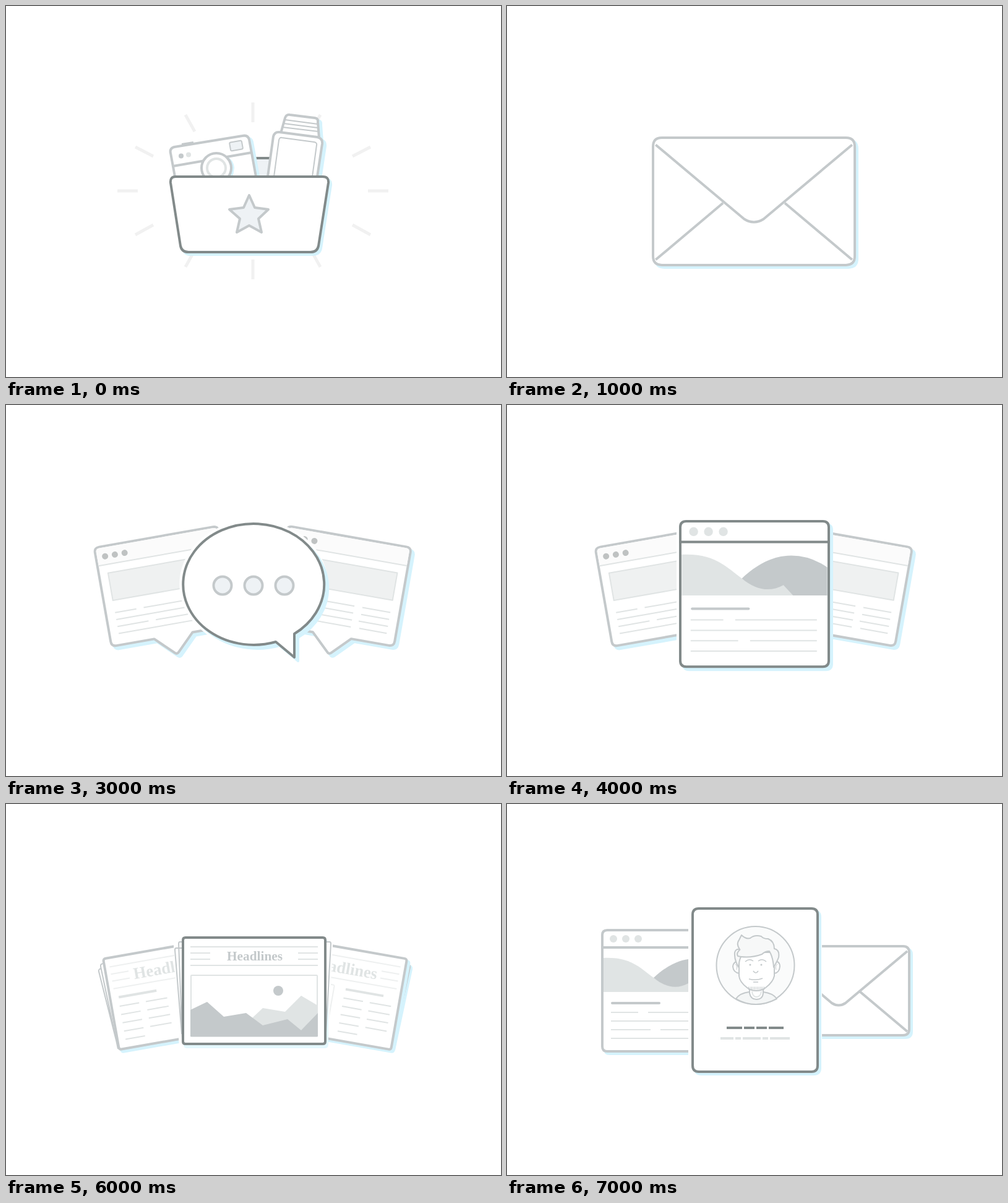
An HTML page for the animation above (8 s loop, 800x600 px).

```html
<!DOCTYPE html>
<html lang="en">
<head>
<meta charset="utf-8">
<title>Collections</title>
<style>
  html, body { margin: 0; width: 100%; height: 100%; overflow: hidden; background: #fff; }
  svg { display: block; width: 800px; height: 600px; fill: none; stroke-linejoin: round; }
  path, circle { vector-effect: non-scaling-stroke; }
  text { font-family: "Liberation Serif", serif; font-weight: bold; text-anchor: middle; }
</style>
</head>
<body>
<svg id="stage" viewBox="0 0 800 600"></svg>
<script>
const DARK = '#828a8a', GRAY = '#c4c9cb', MID = '#d6dada', LIGHT = '#e0e4e4', PALE = '#eef2f5';
const WHITE = '#fff', CYAN = '#d5f3fd', ICE = '#e4f8fe';

// Drawing helpers; each returns SVG markup or path data
const line = (d, stroke = GRAY, width = 4, fill = 'none') =>
  `<path d="${d}" stroke="${stroke}" stroke-width="${width}" fill="${fill}"/>`;
const solid = (d, fill) => `<path d="${d}" fill="${fill}"/>`;
const ring = (x, y, r, stroke, width, fill = 'none') =>
  `<circle cx="${x}" cy="${y}" r="${r}" stroke="${stroke}" stroke-width="${width}" fill="${fill}"/>`;
const dot = (x, y, r, fill) => `<circle cx="${x}" cy="${y}" r="${r}" fill="${fill}"/>`;
const put = (transform, body) => `<g transform="${transform}">${body}</g>`;
const shadow = (d, color = CYAN, dx = 5, dy = 5, transform = '') =>
  put(`translate(${dx} ${dy}) ${transform}`, line(d, color, 4, color));
const halo = (d, width = 12) => line(d, WHITE, width, WHITE);
const box = (x, y, w, h, r = 0) =>
  `M${x + r} ${y}h${w - 2 * r}q${r} 0 ${r} ${r}v${h - 2 * r}q0 ${r} ${-r} ${r}h${2 * r - w}q${-r} 0 ${-r} ${-r}v${2 * r - h}q0 ${-r} ${r} ${-r}Z`;
// Horizontal dashes at height y, given as start/end pairs
const row = (y, ...xs) => xs.map((x, i) => (i % 2 ? `H${x}` : `M${x} ${y}`)).join('');
const tilt = (x, y, angle, scale = 1) => `translate(${x} ${y}) rotate(${angle}) scale(${scale})`;

function stuffedFolder() {
  const camera = 'M273 276L266 238Q264 230 272 228L382 210Q391 208 393 216L404 276Z';
  const cards = 'M444 206L451 181Q453 175 459 176L499 181Q505 182 504 188L506 214Z';
  const phone = 'M423 276L432 211Q434 203 442 204L503 212Q512 214 511 223L503 276Z';
  const front = 'M274 276H512Q522 276 521 286L505 388Q503 398 492 398H295Q284 398 282 388L266 286Q265 276 274 276Z';
  const rays = 'M399 156v32M399 410v32M180 299h33M585 299h33M290 176l15 27M508 176l-15 27M209 228l29 15M589 228l-29 15'
    + 'M209 370l29-16M589 370l-29-16M290 422l15-27M508 422l-15-27';
  return line(rays, '#f1f1f1', 5)
    + solid('M390 246H440V276H390Z', PALE) + line('M390 246H440', DARK)
    + shadow(camera, CYAN, 5, 4) + line('M284 224L303 221') + line(camera, GRAY, 4, WHITE) + line('M270 259L397 237')
    + solid('M364 262a24 24 0 0 0 -10 -20q14 5 15 20l-2 12h-8Z', CYAN)
    + ring(340, 262, 24, GRAY, 4, WHITE) + ring(340, 262, 15, LIGHT, 4)
    + dot(283, 242.5, 4, GRAY) + dot(295, 240.5, 4, LIGHT)
    + put('rotate(-10 372 226)', line(box(362, 219, 20, 14, 2), GRAY, 2, PALE))
    + shadow(cards, CYAN, 5, 4) + shadow(phone, CYAN, 5, 4)
    + line(cards, GRAY, 4, WHITE) + line('M451 184l53 7M449 190l55 7M447 196l58 7', GRAY, 2)
    + line(phone, GRAY, 4, WHITE)
    + line('M433 276L441 217Q442 212 446 213L498 220Q503 221 502 225L495 276', GRAY, 2)
    + shadow(front, CYAN, 4, 4) + line(front, DARK, 4, WHITE)
    + line('M393 306L402 326L424 329L408 344L413 366L393 355L373 366L378 344L361 329L384 326Z', GRAY, 4, PALE);
}

function envelope() {
  return line(box(0, 0, 228, 144, 10), GRAY, 4, WHITE)
    + line('M3 8L103 92Q114 99 125 92L225 8M79 74L3 138M149 74L225 138');
}

function bigLetter() {
  const place = 'translate(236 213) scale(1.43)';
  return shadow(box(0, 0, 228, 144, 10), CYAN, 4, 4, place) + put(place, envelope());
}

const fullTable = 'M403 265V361M431 265V361' + row(341, 318, 476)
  + row(275, 320, 378, 407, 421, 438, 472) + row(287, 320, 356, 407, 425, 438, 451)
  + row(299, 320, 366, 407, 419, 438, 461) + row(311, 320, 376, 407, 415, 438, 470)
  + row(323, 320, 348, 360, 388, 407, 425, 438, 443, 451, 463)
  + row(351, 407, 421, 438, 459) + row(385, 318, 362) + row(397, 318, 342);

const column = x => row(275, x, x + 38) + row(287, x, x + 18) + row(299, x, x + 27)
  + row(311, x, x + 36) + row(323, x, x + 9, x + 15, x + 30);
const leftTable = 'M363 265V361' + column(320)
  + row(275, 375, 385, 390, 404) + row(287, 375, 412) + row(299, 375, 402) + row(311, 375, 392) + row(323, 375, 410);
const rightTable = 'M425 265V361' + column(434) + row(275, 375, 412) + row(287, 375, 412) + row(323, 400, 410);

const cover = box(286, 175, 224, 266, 6);
const backCover = 'M508 184H518Q520 184 520 186V210H526Q528 210 528 213V249Q528 252 525 252H520V430Q520 432 518 432H508';

function documentFolder(edge, ink, table) {
  const sheet = box(303, 193, 190, 234);
  const turned = angle => put(`rotate(${angle} 398 310)`, line(sheet, GRAY, 2, WHITE));
  return line(backCover, edge, 4, WHITE) + line(cover, edge, 4, edge === DARK ? '#f7f8f8' : '#fcfcfc')
    + turned(2) + turned(-2)
    + put('translate(3 3)', `<g opacity=".6">${solid(sheet, '#a9ddf0')}</g>`)
    + line(sheet, GRAY, 2, WHITE) + ring(335, 225, 14, ink, 2)
    + line(row(217, 420, 454) + row(229, 420, 474) + row(265, 318, 476) + row(361, 318, 476) + table, ink, 2);
}

function documents() {
  const side = (x, y, angle, table) =>
    put(tilt(x, y, angle, .812) + ' translate(-286 -175)', documentFolder(GRAY, MID, table));
  return solid('M222 428L290 416V404L222 418ZM510 404L590 422V428L510 414Z', ICE)
    + side(172, 214, -10, leftTable) + side(447, 182, 10, rightTable)
    + shadow(backCover, ICE) + shadow(cover, ICE) + documentFolder(DARK, MID, fullTable);
}

const bubbleWindow = 'M8 0H195Q203 0 203 8V154Q203 162 195 162H133L105 190Q102 193 99 190L70 162H8Q0 162 0 154V8Q0 0 8 0Z';
const plainWindow = box(0, 0, 203, 162, 8);

function page(frame, gaps) {
  const text = gaps.map(([from, to], i) => row(109 + i * 11.4, 15, from, to, 188)).join('');
  return line(frame, GRAY, 4, WHITE) + solid('M2 8Q2 2 8 2H195Q201 2 201 8V30H2Z', '#fbfbfb')
    + line(row(30, 2, 201), LIGHT, 2)
    + [14, 30, 46].map(x => dot(x + 1, 16.5, 5, '#bfc2c2')).join('')
    + line(box(15, 44, 173, 45), LIGHT, 2, '#eff1f1') + line(text, LIGHT, 2);
}

function pagePair(frame) {
  const side = (transform, gaps) => shadow(frame, CYAN, 5, 5, transform) + put(transform, page(frame, gaps));
  return side(tilt(142.5, 231, -10), [[50, 62], [188, 188], [66, 78], [188, 188]])
    + side(tilt(455, 195.5, 10), [[129, 142], [129, 142], [129, 140], [129, 143]]);
}

function chat() {
  const bubble = 'M466 370A114 98 0 1 0 436 383L466 408Z';
  return pagePair(bubbleWindow) + halo(bubble) + shadow(bubble, CYAN, 6, 6) + line(bubble, DARK, 4, WHITE)
    + [350, 400, 450].map(x => ring(x, 292, 14.5, GRAY, 4, PALE)).join('');
}

function browser(edge) {
  return line(box(0, 0, 200, 196, 8), edge, 4, WHITE) + line(row(28, 0, 200), edge)
    + [18, 38, 58].map(x => dot(x, 14, 6, LIGHT)).join('')
    + solid('M83 77C101 60 121 49 139 47Q170 43 198 62V100H83Z', GRAY)
    + solid('M2 45C46 43 61 61 83 77C102 93 121 96 139 86L152 100H2Z', LIGHT)
    + `<path d="${row(118, 16, 92)}" stroke="${GRAY}" stroke-width="4" stroke-linecap="round"/>`
    + line(row(133, 14, 58, 74, 184) + row(147, 14, 184) + row(161, 14, 78, 94, 184) + row(175, 14, 184), LIGHT, 2);
}

function browsers() {
  const frame = box(0, 0, 200, 196, 8), place = 'translate(280 188) scale(1.2)';
  return pagePair(plainWindow) + put(place, halo(frame)) + shadow(frame, CYAN, 5, 5, place) + put(place, browser(DARK));
}

function shirts() {
  const main = 'M272 237L326 205Q340 195 358 194Q400 192 442 194Q460 195 474 205L529 237L506 281L473 266V387'
    + 'Q455 399 400 399Q345 399 326 387V266L295 281Z';
  const side = 'M151 270L191 232Q200 224 212 221Q255 211 300 207Q360 200 380 240L400 370Q300 390 250 392Q228 393 220 388L202 284L177 303Z';
  const mirror = 'translate(801 0) scale(-1 1)';
  const neck = 'M222 219C232 251 282 251 284 209';
  const sideBody = line(side, GRAY, 4, WHITE) + solid('M223 220l8-2q3 14 12 23q-14-6-20-21Z', CYAN)
    + put('rotate(-8 256 232)', line('M243 240V226Q243 224 245 224H267Q269 224 269 226V240', LIGHT, 2)
      + line(row(231, 249, 264) + row(235, 249, 264), LIGHT, 2))
    + line(neck);
  return shadow(side, CYAN, 6, 6) + sideBody
    + shadow(side, CYAN, 6, 6, mirror) + put(mirror, sideBody)
    + put('rotate(-10 270.5 304)', line(box(241, 275, 59, 58, 5), LIGHT, 4, '#f8fafc'))
    + ring(531, 303.5, 29, LIGHT, 4, '#f8fafc')
    + halo(main, 14) + shadow(main, CYAN, 6, 6) + line(main, DARK, 4, WHITE)
    + line('M282 231L304 276M293 225L317 270M518 231L496 276M507 225L483 270', GRAY, 6)
    + line('M357 195C359 248 441 248 443 195', GRAY)
    + line(box(383, 206, 32, 22, 2) + row(214, 390, 408) + row(218, 390, 408), LIGHT, 2)
    + line('M364 195C366 238 434 238 436 195', DARK) + line(main, DARK)
    + line('M372 327Q364 327 368 320L397 268Q401 261 405 268L434 320Q438 327 430 327Z', GRAY, 4, PALE);
}

function news() {
  const front = box(286, 216, 230, 172, 4), small = box(0, 0, 199, 149, 4);
  const title = (x, y, size, fill) => `<text x="${x}" y="${y}" font-size="${size}" fill="${fill}">Headlines</text>`;
  const side = (transform, offset, extra) => {
    let columns = '';
    for (let i = 0; i < 5; i++) {
      columns += row(80 + i * 13.6, ...[13, 45, ...(i < 4 ? [56, 91] : [])].map(x => x + offset));
    }
    return shadow(small, CYAN, 4, 4, transform) + put(transform, line(small, GRAY, 4, WHITE)
      + line(row(14.5, 8, 191) + row(26.5, 8, 37, 162, 191) + row(38, 8, 37, 162, 191) + row(50.5, 8, 191) + extra, '#eef0f0', 2)
      + title(100, 41, 26.5, LIGHT)
      + line(row(65.5, 14 + offset, 76 + offset), LIGHT) + line(columns, LIGHT, 2));
  };
  return line('M154 266Q149 267 150 271L181 394M158 258Q152 258 153 263L181 396', GRAY, 2, WHITE)
    + side(tilt(157, 250.5, -10), 0, '')
    + shadow('M647 258Q654 259 653 264L625 395', CYAN, 2, 3)
    + line('M647 258Q654 259 653 264L625 395', GRAY, 2, WHITE)
    + side(tilt(452, 216, 10), 96, box(8, 62, 83, 72, 2))
    + solid('M270 210H529L520 396H280Z', WHITE) + shadow(front, ICE, 3, 5)
    + line('M290 233H275Q273 233 273 236L284 372M290 223H281Q279 223 279 226L285 380M512 223H523Q525 223 525 226L517 370', GRAY, 2, WHITE)
    + line(front, DARK, 4, WHITE)
    + line(row(231, 298, 504) + row(241, 298, 330, 472, 504) + row(251, 298, 330, 472, 504) + row(261, 298, 504), LIGHT, 2)
    + title(402, 253, 21.3, GRAY)
    + line(box(299, 277, 204, 99, 1), LIGHT, 2) + dot(440, 302, 8, GRAY)
    + solid('M398 346L415 330L451 336L477 310L504 326V376H398Z', LIGHT)
    + solid('M298 333L325 320L352 344L388 338L415 358L455 348L477 366L504 338V376H298Z', GRAY);
}

function portrait() {
  const pen = (d, fill) => line(d, GRAY, 2, fill);
  return ring(401.5, 261, 63, GRAY, 2, '#fafbfb')
    + pen('M370 315Q376 306 391 304H414Q430 306 436 315Q402 333 370 315Z', '#f4f6f6')
    + pen('M392 300V306Q394 316 403 316Q413 316 414 306V300', WHITE)
    + line('M396 303Q397 312 403 312Q410 312 411 303', LIGHT, 2)
    + pen('M376 254Q366 254 365 263Q366 273 376 274M432 254Q441 254 441 263Q440 273 432 274', WHITE)
    + line('M369 259Q373 262 371 268M437 259Q433 262 435 268', GRAY, 1)
    + pen('M375 240V278Q376 288 388 297Q394 302 403 302Q412 302 418 297Q430 288 432 278V240Z', WHITE)
    + `<path d="M390 298H416" stroke="${GRAY}" stroke-width="5" stroke-dasharray="1 1.5"/>`
    + pen('M375 265Q367 253 368 240Q370 234 376 235Q370 226 375 220L379 212Q386 219 393 217Q400 211 411 214'
      + 'Q414 218 422 218Q432 222 432 234Q441 236 439 248Q436 256 431 264Q430 248 424 238Q417 238 412 243Q396 249 378 247Q374 256 375 265Z', '#f7f8f8')
    + pen('M377 235Q370 241 373 246L378 247')
    + line('M385 255Q391 249 398 254M406 254Q413 249 419 255M398 270Q402 276 406 270M391 283Q402 286 413 282M398 288H406', GRAY, 1.5)
    + dot(393, 260, 1.5, GRAY) + dot(411, 260, 1.5, GRAY);
}

function contact() {
  const card = box(300, 169, 202, 264, 10), frame = box(0, 0, 200, 196, 8), mail = box(0, 0, 228, 144, 10);
  const left = 'translate(154 204)', right = 'translate(422 230)';
  return shadow(frame, CYAN, 4, 4, left) + put(left, browser(GRAY))
    + shadow(mail, CYAN, 4, 4, right) + put(right, envelope())
    + halo(card, 14) + shadow(card, CYAN, 4, 4) + line(card, DARK, 4, WHITE) + portrait()
    + line(row(362, 355, 380, 383, 400, 403, 420, 423, 447), DARK)
    + line(row(379, 345, 366, 369, 378, 381, 410, 413, 422, 425, 457), LIGHT);
}

const scenes = [stuffedFolder, bigLetter, documents, chat, browsers, shirts, news, contact];
const stage = document.getElementById('stage');
stage.innerHTML = scenes.map(scene => `<g display="none">${scene()}</g>`).join('');
const groups = [...stage.children];

function render() {
  const current = Math.floor(performance.now() / 1000) % scenes.length;
  groups.forEach((group, i) => group.setAttribute('display', i === current ? 'inline' : 'none'));
  requestAnimationFrame(render);
}
render();
</script>
</body>
</html>
```
